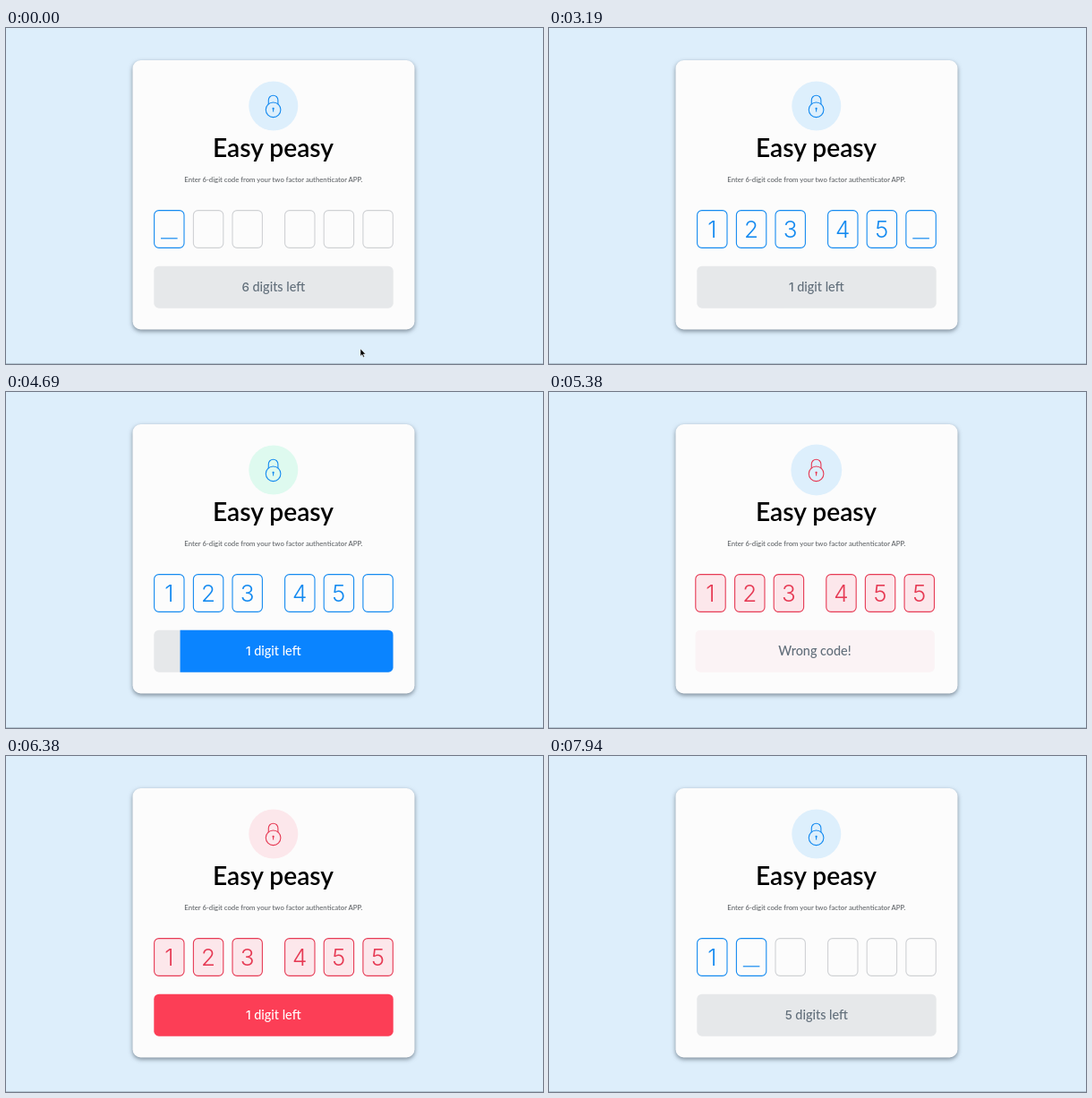
Animation of 600 by 375 pixels, one loop 8 s. Source, as an HTML page:

```html
<!DOCTYPE html>
<html lang="en">
<head>
<meta charset="utf-8">
<title>Code entry</title>
<style>
html, body { margin: 0; width: 100%; height: 100%; overflow: hidden; background: #ddeefb; }
svg { display: block; width: 100vw; height: 100vh; }
text { text-anchor: middle; font-family: Lato, "Open Sans", sans-serif; }
.num { font-family: Inter, sans-serif; font-weight: 300; font-size: 26px; }
.card { filter: drop-shadow(0 2px 2.5px rgba(40, 55, 70, .55)); }
</style>
</head>
<body>
<svg viewBox="0 0 600 375">
  <defs><clipPath id="pill"><rect x="165.3" y="265.7" width="267.4" height="47" rx="5.5"/></clipPath></defs>
  <rect width="600" height="375" fill="#ddeefb"/>
  <rect y="374" width="600" height="1" fill="#b4c6d3"/>
  <rect class="card" x="141.5" y="36" width="315" height="300.5" rx="9" fill="#fcfcfc"/>
  <circle id="disc" cx="298.8" cy="87" r="27.5"/>
  <g id="lock" fill="none" stroke-width="1.1">
    <path id="shackle" d="M293.3 85.2V80.5a5.3 5.3 0 0 1 10.6 0V85.2"/>
    <circle cx="298.6" cy="91.3" r="8.3"/>
    <circle id="hole" cx="298.6" cy="89.9" r="1.1" stroke="none"/>
    <path d="M298.6 90v3.6"/>
  </g>
  <text x="298.5" y="144" font-size="28.2" font-weight="600">Easy peasy</text>
  <text x="298.8" y="171.7" font-size="7.75" fill="#606468" font-weight="500">Enter 6-digit code from your two factor authenticator APP.</text>
  <g id="form">
    <g id="boxes"></g>
    <g clip-path="url(#pill)">
      <rect id="base" x="165" y="265" width="268" height="48"/>
      <rect id="fill" y="265" height="48" fill="#0a84ff"/>
    </g>
    <text id="label" x="298.8" y="294.2" font-size="14.4" font-weight="500"></text>
  </g>
  <path id="cursor" d="M396 358v8.2l1.9-1.7 1.3 2.9 1.3-.6-1.3-2.8h2.6z" fill="#000" stroke="#fff" stroke-width=".5"/>
</svg>
<script>
const LOOP = 8000, SUCCESS = 3250, UNDO = 4580, ERROR = 5250, RESET = 6380;
const $ = id => document.getElementById(id);
const C = {
  blue: [20, 138, 240], red: [230, 58, 84], grey: [207, 209, 212],
  white: [255, 255, 255], ink: [97, 110, 122], paper: [252, 252, 252],
  blush: [252, 231, 235], sky: [221, 239, 252], mint: [222, 251, 238],
  idle: [230, 232, 234], pale: [251, 243, 245], alert: [252, 62, 86]
};
// x of each box, and [digit, typed at, removed at] entries
const SLOTS = [
  [165.6, ['1', 380, 1e9]],
  [209.4, ['2', 750, 7370]],
  [253, ['3', 1100, 7190]],
  [311.6, ['4', 1900, 6780]],
  [355.2, ['5', 2500, 6580]],
  [398.9, ['6', SUCCESS, UNDO], ['5', ERROR, RESET]]
];

const clamp = v => Math.max(0, Math.min(1, v));
const ramp = (t, start, len) => clamp((t - start) / len);
const ease = k => k * k * (3 - 2 * k);
const span = (t, on, off, up, down) => ease(ramp(t, on, up)) * (1 - ease(ramp(t, off, down)));
const mix = (a, b, k) => a.map((v, i) => v + (b[i] - v) * k);
const rgb = c => `rgb(${c.map(Math.round)})`;
const pulse = (t, start, len) => Math.sin(Math.PI * ramp(t, start, len)) ** 2;
const set = (el, attrs) => { for (const k in attrs) el.setAttribute(k, attrs[k]); };

function add(tag, attrs) {
  const el = document.createElementNS('http://www.w3.org/2000/svg', tag);
  set(el, attrs);
  return $('boxes').appendChild(el);
}

const boxes = SLOTS.map(([x, ...runs], i) => ({
  x, runs,
  frame: add('rect', { x, y: 203.6, width: 33.4, height: 41.8, rx: 5.2, 'stroke-width': 1.1 }),
  bar: add('rect', { x: x + 7.4, y: 234.2, width: 18.6, height: 1.2, fill: rgb(C.blue) }),
  glyph: add('text', { x: x + 16.7, class: 'num' }),
  from: i ? SLOTS[i - 1][1][1] : -1e9,
  until: i ? SLOTS[i - 1][1][2] : 1e9
}));

function drawBox(b, t, bad) {
  const lit = span(t, b.from, b.until, 150, 150);
  set(b.frame, {
    stroke: rgb(mix(mix(C.grey, C.blue, lit), C.red, bad)),
    fill: rgb(mix(C.paper, C.blush, bad))
  });
  const run = b.runs.find(r => t < r[2] + 120) || b.runs[b.runs.length - 1];
  const [digit, on, off] = run;
  const enter = ease(ramp(t, on, 130)), leave = ease(ramp(t, off, 100));
  b.glyph.textContent = digit;
  set(b.glyph, {
    y: 233.6 + 8 * (1 - enter) + 8 * leave,
    opacity: enter * (1 - leave),
    fill: rgb(mix(C.blue, C.red, bad))
  });
  let bar = span(t, b.from + 100, b.until, 150, 100);
  for (const [, a, z] of b.runs) bar *= 1 - ramp(t, a, 100) * (1 - ramp(t, z + 120, 130));
  set(b.bar, { opacity: bar });
}

let shown = '';
function setLabel(t) {
  const n = boxes.filter(b => b.runs.some(r => t >= r[1] && t < r[2])).length;
  const left = 6 - n;
  const html = left
    ? `<tspan font-family="Inter, sans-serif" font-size="13.4">${left}</tspan> digit${left > 1 ? 's' : ''} left`
    : t < ERROR ? 'Verify' : 'Wrong code!';
  if (html !== shown) $('label').innerHTML = shown = html;
}

function render(t) {
  const bad = span(t, ERROR, RESET, 100, 200);
  for (const b of boxes) drawBox(b, t, bad);
  setLabel(t);

  const wipeIn = ease(ramp(t, SUCCESS, 500)), wipeOut = ease(ramp(t, UNDO, 540));
  set($('fill'), { x: 165.3 + 267.4 * wipeOut, width: 267.4 * Math.max(0, wipeIn - wipeOut) });
  const pale = span(t, ERROR, RESET, 110, 200), hot = span(t, 5370, RESET, 450, 200);
  set($('base'), { fill: rgb(mix(mix(C.idle, C.pale, pale), C.alert, hot)) });
  const bright = Math.max(clamp(wipeIn * 2 - .5) * (1 - clamp(wipeOut * 2 - .5)), hot);
  set($('label'), { fill: rgb(mix(C.ink, C.white, bright)) });

  const shake = ramp(t, 5335, 560);
  set($('form'), { transform: `translate(${-6 * Math.sin(shake * Math.PI * 6) * (1 - shake) * Math.min(1, shake * 4)} 0)` });

  const mint = span(t, SUCCESS + 80, UNDO + 60, 300, 350);
  const rose = span(t, 5390, RESET, 350, 250);
  set($('disc'), {
    r: 27.5 * (1 + .58 * pulse(t, 3350, 600) + .24 * pulse(t, 5310, 580)),
    fill: rgb(mix(mix(C.sky, C.mint, mint), C.blush, rose))
  });
  const tone = rgb(mix(C.blue, C.red, bad));
  set($('lock'), { stroke: tone });
  set($('hole'), { fill: tone });
  set($('shackle'), { transform: `translate(0 ${-3 * span(t, SUCCESS + 100, UNDO - 150, 250, 200)})` });
  set($('cursor'), { visibility: t < 380 ? 'visible' : 'hidden' });
}

const start = performance.now();
function tick() {
  render((performance.now() - start) % LOOP);
  requestAnimationFrame(tick);
}
tick();
</script>
</body>
</html>
```
